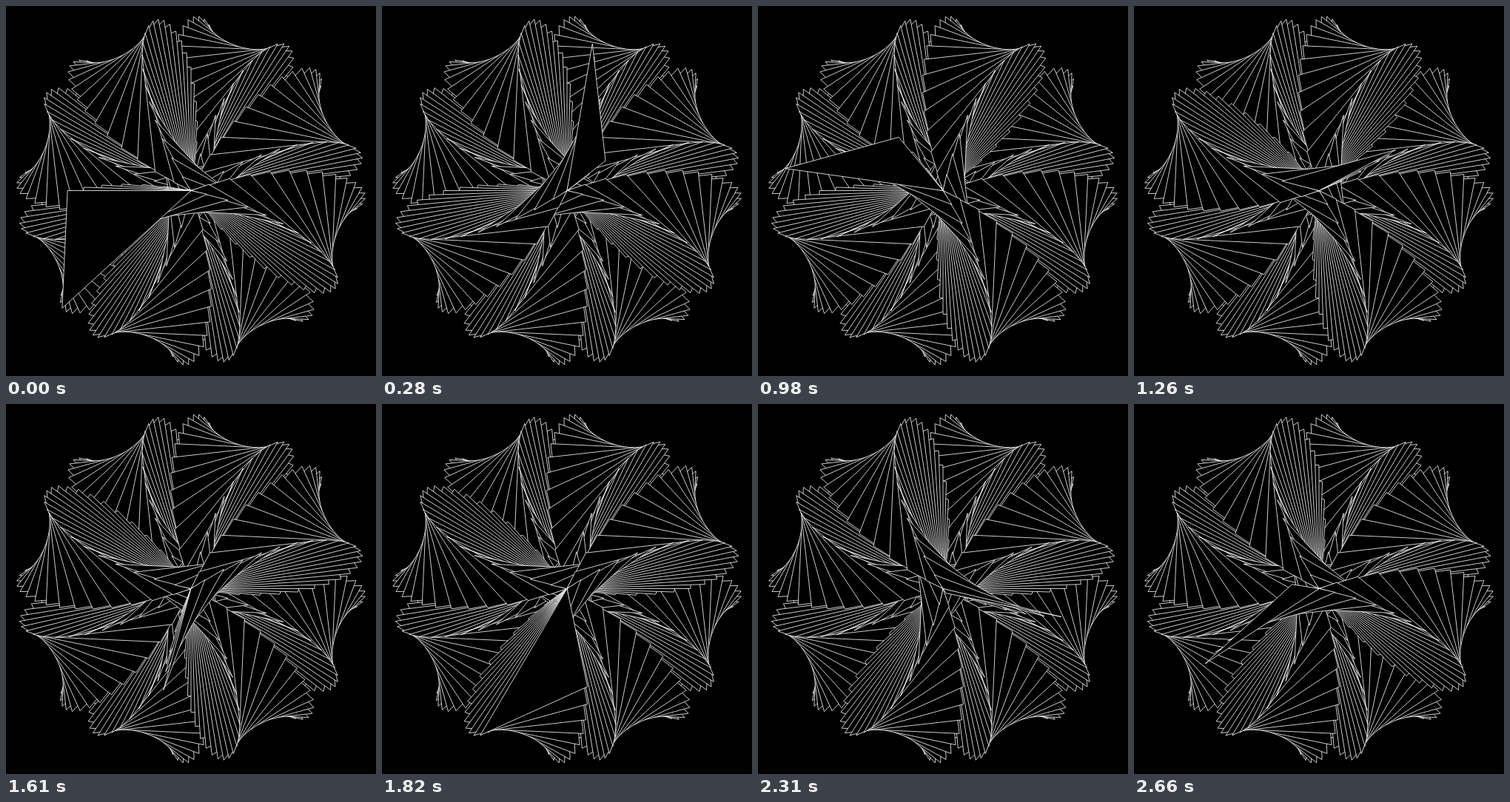
Recreate the animation shown at these times as an HTML page. Size 500x500 px, loop 2.73 s.

```html
<!DOCTYPE html>
<html lang="en">
<head>
<meta charset="utf-8">
<title>Spinning triangles</title>
<style>
  html, body { margin: 0; width: 100%; height: 100%; overflow: hidden; background: #000; }
  svg { display: block; width: 100vw; height: 100vh; }
  polygon { fill: #000; stroke: #fff; stroke-width: 0.8; }
</style>
</head>
<body>
<svg id="stage" viewBox="0 0 500 500"></svg>
<script>
  const LOOP = 2730;
  const STEP = 70;
  const COUNT = 200;                           // 25 triangles for each of the 8 lobes
  const PER_STEP = COUNT * STEP / LOOP;
  const CX = 250, CY = 249.5;
  const SIZE = 236;                            // diameter of the rolling circle
  const SPREAD = 42.4;                         // angle of each triangle at the centre
  const RAD = Math.PI / 180;

  const stage = document.getElementById('stage');
  const shapes = Array.from({ length: COUNT }, () =>
    stage.appendChild(document.createElementNS('http://www.w3.org/2000/svg', 'polygon')));

  // Point on a circle that passes through the centre while turning around it
  function corner(turn, shift) {
    const r = SIZE * Math.sin((45 + 4 * turn + shift) * RAD);
    const a = (180 - turn - shift) * RAD;
    return (CX + r * Math.cos(a)).toFixed(2) + ',' + (CY + r * Math.sin(a)).toFixed(2);
  }

  function triangle(i) {
    const turn = 360 * i / COUNT;
    return `${CX},${CY} ${corner(turn, 0)} ${corner(turn, SPREAD)}`;
  }

  const outlines = shapes.map((_, i) => triangle(i));
  let shown = -1;

  // The newest triangle lies on top, the oldest at the bottom
  function render(ms) {
    const step = Math.floor((ms % LOOP) / STEP);
    if (step === shown) return;
    shown = step;
    const newest = Math.round(step * PER_STEP);
    shapes.forEach((shape, k) =>
      shape.setAttribute('points', outlines[(newest + 1 + k) % COUNT]));
  }

  const start = performance.now();
  function tick() {
    render(performance.now() - start);
    requestAnimationFrame(tick);
  }
  render(0);
  requestAnimationFrame(tick);
</script>
</body>
</html>
```
